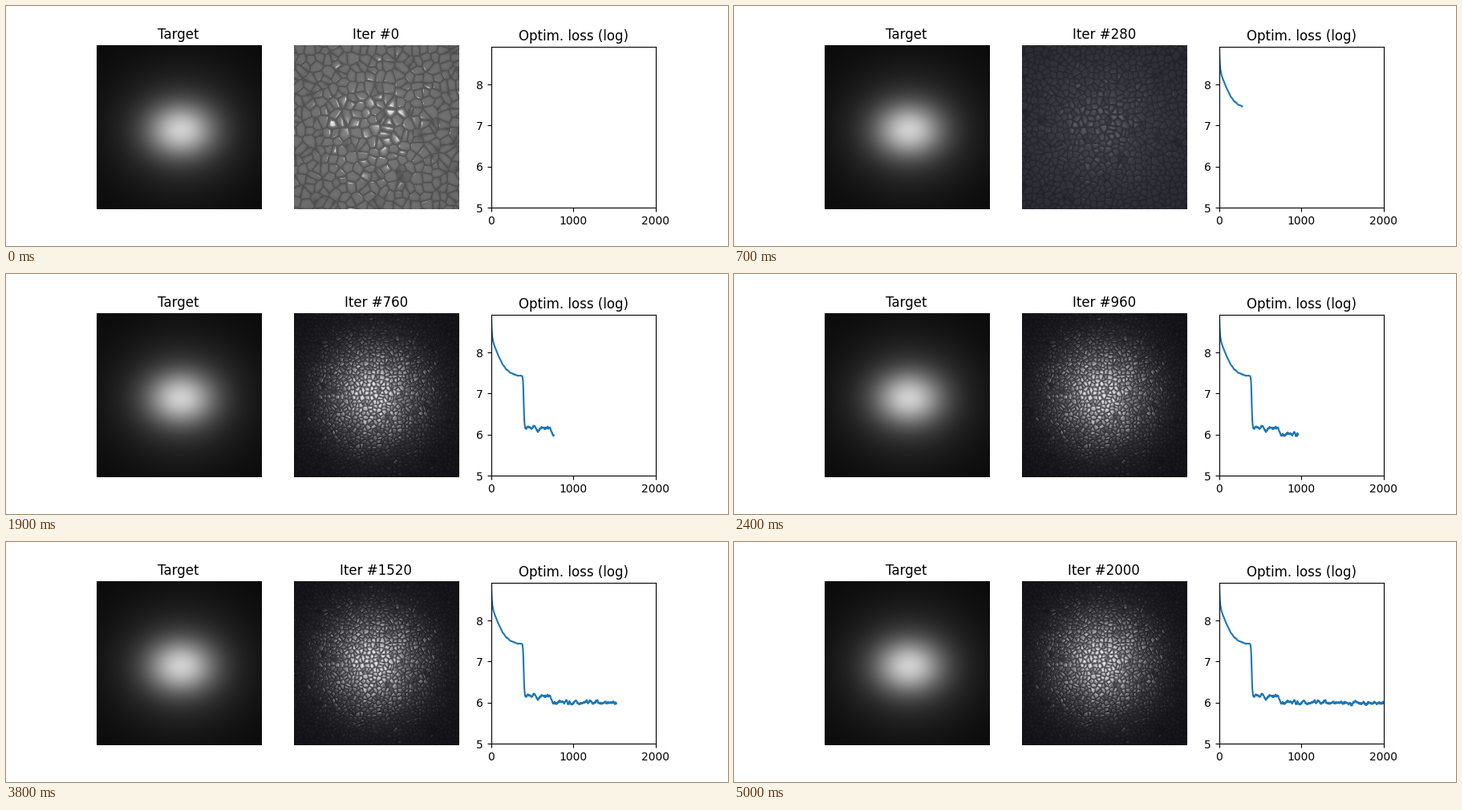
Write a matplotlib script that moves like this. It is 900 px wide and 300 px high and loops after 5.1 s.

```python
import numpy as np
import matplotlib.pyplot as plt
from matplotlib.animation import FuncAnimation

FRAMES, STEP, SIZE = 51, 40, 206

rng = np.random.default_rng(7)
axis = (np.arange(SIZE) + 0.5) / SIZE - 0.5
X, Y = np.meshgrid(axis, axis)

# Jittered cell sites, wider than the view so the pattern can shrink
GRID, SPAN = 46, 2.53
gx, gy = np.meshgrid(np.arange(GRID), np.arange(GRID))
sites = np.stack([gx.ravel(), gy.ravel()], 1) + rng.random((GRID * GRID, 2))
sites = (sites / GRID - 0.5) * SPAN
tilts = rng.normal(0, 1, sites.shape)


def sigmoid(t):
    return 0.5 + 0.5 * np.tanh(t / 2)


def smooth_noise(count, width, amount):
    window = np.hanning(width)
    noise = np.convolve(rng.normal(0, 1, count), window, "same")
    return amount * noise / np.sqrt((window**2).sum())


def loss_curve():
    """Fast decay, a steep drop near 395, then a noisy plateau."""
    it = np.arange((FRAMES - 1) * STEP + 1)
    early = 7.42 + 0.9 * np.exp(-(it / 130) ** 1.4) + 0.6 * np.exp(-it / 8)
    late = 5.99 + 0.2 * sigmoid((735 - it) / 12)
    late -= 0.08 * np.exp(-((it - 580) / 35) ** 2)
    before = sigmoid((395 - it) / 4)
    noise = smooth_noise(it.size, 50, 0.025) + smooth_noise(it.size, 9, 0.012)
    return it, late + (early - late) * before + noise * (1 - 0.8 * before)


def relief(scale):
    """Height of the cell pattern and the tilt of the cell at each pixel."""
    pts = sites * scale
    gap = SPAN / GRID * scale
    height = np.empty((SIZE, SIZE))
    tilt = np.empty((SIZE, SIZE, 2))
    inside = np.abs(pts[:, 0]) < 0.5 + 2 * gap
    for row, y in enumerate(axis):
        near = np.flatnonzero(inside & (np.abs(pts[:, 1] - y) < 2.5 * gap))
        dist = np.hypot(axis[:, None] - pts[near, 0], y - pts[near, 1])
        first, second = np.partition(dist, 1, axis=1)[:, :2].T
        height[row] = np.tanh(4 * (second - first) / gap)
        tilt[row] = tilts[near[dist.argmin(1)]]
    return height, tilt


reliefs = {}


def render(it):
    """The leather darkens and shrinks first, then turns glossy."""
    settle = 1 - np.exp(-it / 90)
    gloss = sigmoid((it - 400) / 8)

    def mix(start, dull, shiny):
        return start + (dull - start) * settle + (shiny - dull) * gloss

    scale = round(mix(1, 0.65, 0.46), 3)
    if scale not in reliefs:
        reliefs[scale] = relief(scale)
    height, tilt = reliefs[scale]

    dy, dx = np.gradient(height)
    x, y = X + 0.015, Y + 0.005
    bump, wobble, rough = mix(0.2, 0.15, 0.09), mix(0.14, 0.1, 0.055), mix(0.07, 0.1, 0.14)
    sx = x - bump * dx / dx.std() + wobble * tilt[..., 0]
    sy = y - bump * dy / dy.std() + wobble * tilt[..., 1]
    spec = np.exp(-(sx**2 + sy**2) / (2 * rough**2)) * height**2
    soft = np.exp(-(x**2 + y**2) / (2 * mix(0.3, 0.3, 0.22) ** 2))

    body = (mix(102, 38, 20) + mix(14, 22, 80) * soft) * (0.72 + 0.33 * height)
    value = body + mix(120, 28, 130) * spec
    rgb = value[..., None] + mix(0, 9, 5) * np.array([0, 0, 1])
    return np.clip(rgb, 0, 255).astype(np.uint8)


def lobe(sx, sy):
    return np.exp(-((X - 0.01) / sx) ** 2 / 2 - ((Y - 0.02) / sy) ** 2 / 2)


target = 10 + 145 * lobe(0.14, 0.11) + 52 * lobe(0.28, 0.25)
images = [render(i * STEP) for i in range(FRAMES)]
iters, losses = loss_curve()

fig, (ax_goal, ax_iter, ax_loss) = plt.subplots(1, 3, figsize=(9, 3), dpi=100)
fig.subplots_adjust(right=0.8999)
ax_goal.imshow(target, cmap="gray", vmin=0, vmax=255)
ax_goal.set_title("Target", x=0.499)
ax_goal.axis("off")

picture = ax_iter.imshow(images[0])
title = ax_iter.set_title("Iter #0")
ax_iter.axis("off")

line, = ax_loss.plot([], [], color="tab:blue", lw=1.5)
ax_loss.set(xlim=(0, 2000), ylim=(5, 8.92), aspect=500,
            xticks=range(0, 2001, 1000), yticks=range(5, 9))
ax_loss.set_title("Optim. loss (log)")


def draw(i):
    it = i * STEP
    picture.set_data(images[i])
    title.set_text(f"Iter #{it}")
    line.set_data(iters[:it + 1], losses[:it + 1])
    return picture, title, line


anim = FuncAnimation(fig, draw, frames=FRAMES, interval=100, repeat=True)
plt.show()
```
